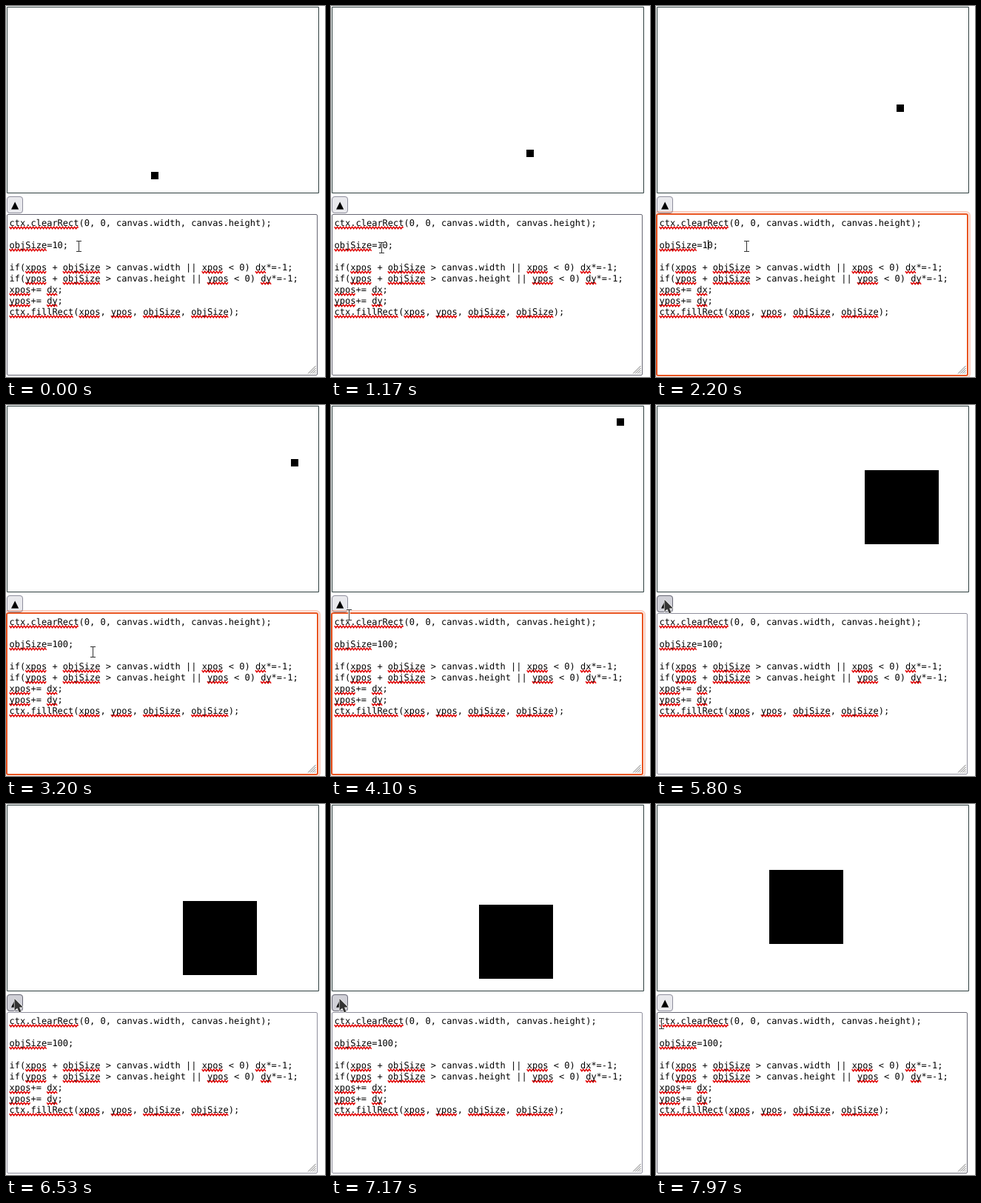
Animation of 431x501 px, one loop 8 s. Source, as an HTML page with a canvas:

```html
<!DOCTYPE html>
<html lang="en">
<head>
<meta charset="utf-8">
<title>Live code editor</title>
<style>
html, body { margin: 0; width: 100%; height: 100%; overflow: hidden; background: #fff; }
canvas { display: block; }
</style>
</head>
<body>
<canvas id="stage" width="431" height="501"></canvas>
<script>
const ctx = document.getElementById('stage').getContext('2d');
const LOOP = 8000;
const MONO = '12px "DejaVu Sans Mono", monospace';
const SANS = '14px "Noto Sans", "Open Sans", sans-serif';
const ICON = '13.33px "DejaVu Sans", sans-serif';
const CHAR = 7.224, LEFT = 4.6, BASE = 297, LEADING = 15;

// Moments of interaction, ms
const CLICK = 1630, TYPE = 2280, TIP = 4850, PRESS = 5230, RELEASE = 5350;
const BLINK = 600;
const GROW = 321; // step at which the new size takes effect

// Spans in which the screen stands still
const stalls = [[870, 1170], [6200, 6430]];

// Time, simulation step: about 60 per second
const pace = [
  [0, 0], [870, 46], [1170, 68], [2200, 129], [4100, 244],
  [5170, 308], [5800, 348], [7170, 430], [7970, 477]
];

// Time, pointer x, pointer y
const pointer = [
  [0, 99, 324], [600, 65, 327], [1500, 72, 325], [1700, 72, 325], [2200, 123, 324],
  [3600, 116, 337], [4100, 25, 283], [4300, 11, 263], [7600, 11, 263], [7900, 8, 296]
];

function shownTime(t) {
  const stall = stalls.find(([a, b]) => t > a && t < b);
  return stall ? stall[0] : t;
}

function sample(keys, t) {
  const i = keys.findIndex(k => k[0] > t);
  if (i < 0) return keys[keys.length - 1].slice(1);
  const p = keys[i - 1], q = keys[i], f = (t - p[0]) / (q[0] - p[0]);
  return p.slice(1).map((v, j) => v + (q[j + 1] - v) * f);
}

function simulate(steps) {
  let x = 194, y = 222, dx = 1, dy = 1, size = 10;
  for (let i = 0; i < steps; i++) {
    size = i + 1 >= GROW ? 100 : 10;
    if (x + size > 420 || x < 0) dx *= -1;
    if (y + size > 250 || y < 0) dy *= -1;
    x += dx;
    y += dy;
  }
  return { x, y, size };
}

function roundBox(x, y, w, h, r) {
  ctx.beginPath();
  ctx.roundRect(x, y, w, h, r);
}

function strokeBox(x, y, w, h, r, color, width) {
  roundBox(x, y, w, h, r);
  ctx.strokeStyle = color;
  ctx.lineWidth = width;
  ctx.stroke();
}

function drawView(steps) {
  strokeBox(1.5, 1.5, 421, 251, 0, '#2f4040', 1);
  const { x, y, size } = simulate(steps);
  ctx.save();
  ctx.beginPath();
  ctx.rect(2, 2, 420, 250);
  ctx.clip();
  ctx.fillStyle = '#000';
  ctx.fillRect(x + 2, y + 2, size, size);
  ctx.restore();
}

function drawButton(hover, pressed) {
  roundBox(1, 257, 22, 23, 4);
  ctx.fillStyle = pressed ? '#b1b1b9' : hover ? '#d0d0d7' : '#e9e9ed';
  ctx.fill();
  strokeBox(1.5, 257.5, 21, 22, 3.5, pressed ? '#484851' : hover ? '#676774' : '#8f8f9d', 1);
  ctx.font = ICON;
  ctx.textAlign = 'center';
  ctx.fillStyle = '#000';
  ctx.fillText('▲', 12, 273);
  ctx.textAlign = 'left';
}

function squiggle(x, y, w) {
  ctx.beginPath();
  for (let i = 0; i <= w; i++) ctx.lineTo(x + i, y - 1.3 * Math.cos(i * Math.PI / 2));
  ctx.strokeStyle = '#e00000';
  ctx.lineWidth = 1.4;
  ctx.stroke();
}

function drawCode(size) {
  const lines = [
    'ctx.clearRect(0, 0, canvas.width, canvas.height);', '',
    `objSize=${size};`, '',
    'if(xpos + objSize > canvas.width || xpos < 0) dx*=-1;',
    'if(ypos + objSize > canvas.height || ypos < 0) dy*=-1;',
    'xpos+= dx;', 'ypos+= dy;',
    'ctx.fillRect(xpos, ypos, objSize, objSize);'
  ];
  ctx.font = MONO;
  ctx.textRendering = 'geometricPrecision';
  lines.forEach((line, i) => {
    const y = BASE + i * LEADING;
    for (const m of line.matchAll(/\b(ctx\.\w+|objSize|[xy]pos|d[xy])\b/g))
      squiggle(LEFT + m.index * CHAR, y + 2.5, m[0].length * CHAR);
    ctx.fillStyle = '#000';
    ctx.fillText(line, LEFT, y);
  });
}

function drawGrip() {
  ctx.beginPath();
  for (let d = 1; d <= 10; d += 3) {
    ctx.moveTo(418 - d, 496.5);
    ctx.lineTo(418.5, 496 - d);
  }
  ctx.strokeStyle = '#777';
  ctx.lineWidth = 1;
  ctx.stroke();
}

function drawEditor(t, hover) {
  const focus = t >= CLICK && t < PRESS;
  const typed = t >= TYPE;
  if (focus) {
    strokeBox(-2, 278, 426, 224, 5, 'rgba(233,84,32,0.28)', 2);
    strokeBox(1, 281, 420, 218, 2, '#e95420', 2);
  } else {
    strokeBox(1.5, 281.5, 419, 217, 1.5, hover ? '#676774' : '#8f8f9d', 1);
  }
  drawCode(typed ? 100 : 10);

  const sinceKey = t - (typed ? TYPE : CLICK);
  if (focus && sinceKey % (2 * BLINK) < BLINK) {
    ctx.fillStyle = '#000';
    ctx.fillRect(typed ? 77 : 70, 316, 1, 13);
  }
  drawGrip();
}

function drawTip() {
  roundBox(13, 287, 113, 44, 4);
  ctx.fillStyle = 'rgba(0,0,0,0.8)';
  ctx.fill();
  ctx.font = SANS;
  ctx.fillStyle = '#fff';
  ctx.fillText('Update Code', 26, 314);
}

function drawBeam(x, y) {
  const pass = (color, width) => {
    ctx.beginPath();
    for (const s of [-7.5, 6.5]) {
      ctx.moveTo(x - 4, y + s + 0.5 * 2);
      ctx.lineTo(x + 3, y + s + 0.5 * 2);
    }
    ctx.moveTo(x - 0.5, y - 6);
    ctx.lineTo(x - 0.5, y + 7);
    ctx.strokeStyle = color;
    ctx.lineWidth = width;
    ctx.stroke();
  };
  pass('rgba(255,255,255,0.8)', 3);
  pass('#333', 1);
}

function drawArrow(x, y) {
  const shape = [[0, 0], [0, 16], [3.7, 12.6], [6.3, 18.4], [9, 17.2], [6.5, 11.6], [11.5, 11.4]];
  ctx.beginPath();
  shape.forEach(([a, b]) => ctx.lineTo(x + a + 0.5, y + b));
  ctx.closePath();
  ctx.lineJoin = 'round';
  ctx.strokeStyle = '#eee';
  ctx.lineWidth = 1.6;
  ctx.stroke();
  ctx.lineJoin = 'miter';
  ctx.fillStyle = '#333';
  ctx.fill();
}

function draw(now) {
  const t = shownTime(now % LOOP);
  const [px, py] = sample(pointer, t).map(Math.round);
  const inEditor = py >= 281;
  ctx.fillStyle = '#fff';
  ctx.fillRect(0, 0, 431, 501);
  drawView(Math.floor(sample(pace, t)[0]));
  drawButton(!inEditor && px < 23, t >= PRESS && t < RELEASE);
  drawEditor(t, inEditor);
  if (t >= TIP && t < PRESS) drawTip();
  if (inEditor) drawBeam(px, py);
  else drawArrow(px, py);
}

const start = performance.now();
function tick() {
  draw(performance.now() - start);
  requestAnimationFrame(tick);
}
tick();
</script>
</body>
</html>
```
